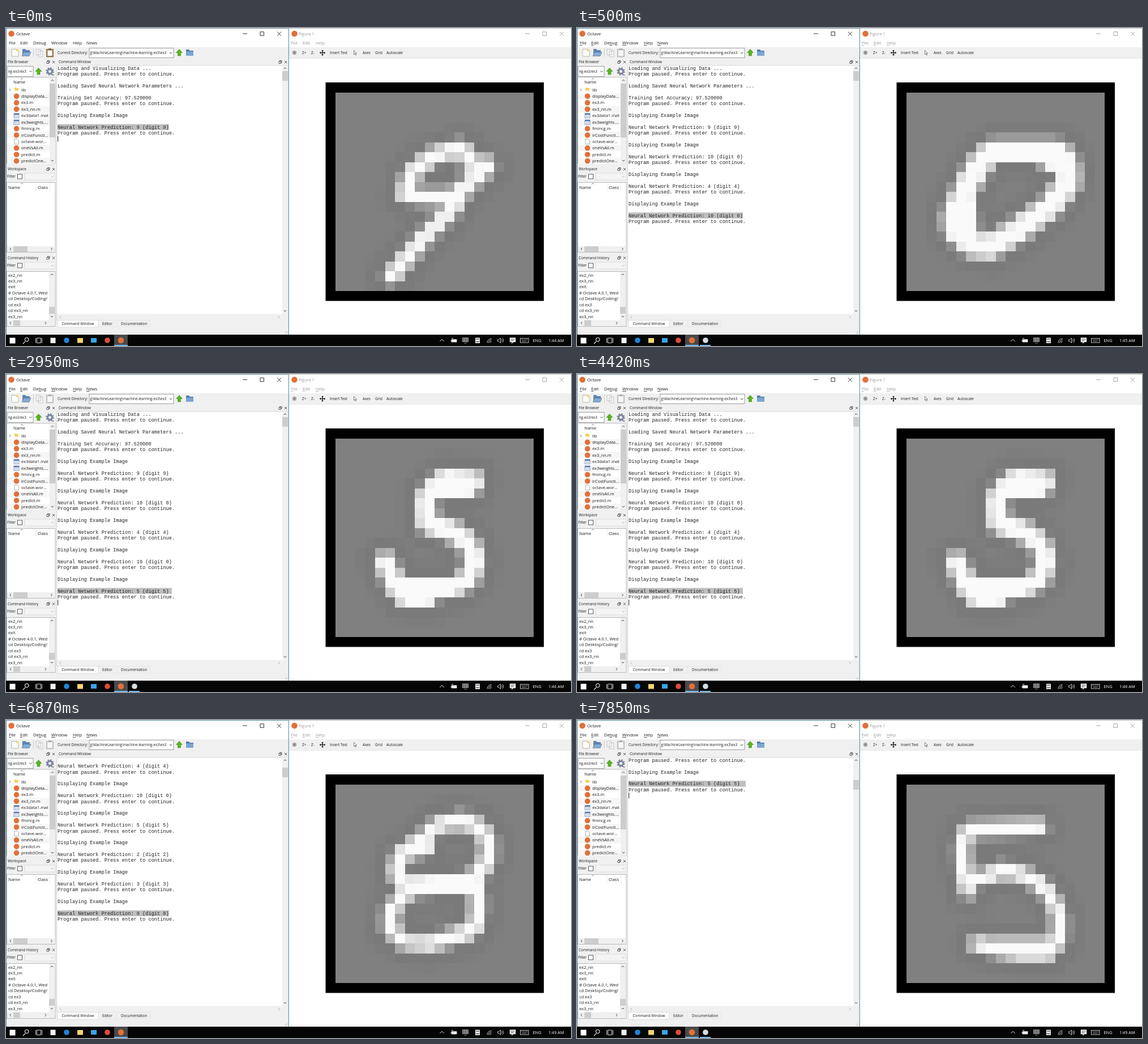
Write an HTML page with a canvas that moves like this. It is 998x561 px and loops after 8000 ms.

```html
<!DOCTYPE html>
<html lang="en">
<head>
<meta charset="utf-8">
<title>Octave</title>
<style>
html, body { margin: 0; width: 100%; height: 100%; overflow: hidden; background: #fff; }
svg { position: absolute; left: 0; top: 0; font-family: "Open Sans", sans-serif; }
canvas { position: absolute; left: 582px; top: 113.8px; width: 350.4px; height: 350.4px; image-rendering: pixelated; }
.mono { font-family: "Liberation Mono", monospace; }
.key { text-decoration: underline; }
</style>
</head>
<body>
<svg width="998" height="561"><g id="still"></g><g id="live"></g></svg>
<canvas id="digit" width="20" height="20"></canvas>
<script>
const ORANGE = '#e2703a', PALE = '#f0f0f0', EDGE = '#c8c8c8', INK = '#1c1c1c';

const rect = (x, y, w, h, fill, stroke = 'none') =>
  `<rect x="${x}" y="${y}" width="${w}" height="${h}" fill="${fill}" stroke="${stroke}" stroke-width=".8"/>`;
const dot = (x, y, r, fill) => `<circle cx="${x}" cy="${y}" r="${r}" fill="${fill}"/>`;
const path = (d, stroke, width = 1, fill = 'none', dash = 'none') =>
  `<path d="${d}" stroke="${stroke}" stroke-width="${width}" fill="${fill}" stroke-dasharray="${dash}"/>`;
// y is the middle of the line; "&" marks the shortcut letter that follows it
const text = (x, y, s, size = 7.5, fill = INK, cls = '') =>
  `<text x="${x}" y="${y + size * .35}" font-size="${size}" fill="${fill}" class="${cls}">` +
  s.replace(/&(.)/, '<tspan class="key">$1</tspan>') + '</text>';
const label = (x, y, s, fill) => text(x, y, s, 6.4, fill);
const mono = (x, y, s) => text(x, y, s, 8.63, '#222', 'mono');
const chevron = (x, y, angle = 0, color = '#444', r = 2.2) =>
  `<path d="M${-r} ${-r / 2}L0 ${r / 2}L${r} ${-r / 2}" fill="none" stroke="${color}" transform="translate(${x} ${y}) rotate(${angle})"/>`;
const folder = (x, y, s, fill) =>
  path(`M${x} ${y}h${s * .4}l${s * .1} ${s * .15}h${s * .5}v${s * .65}h${-s}z`, 'none', 0, fill);
const upArrow = (x, y) => path(`M${x} ${y - 6}l5.5 6h-3v5.5h-5v-5.5h-3z`, '#3c8a14', .6, '#58b520');

function windowButtons(x, color) {
  return path(`M${x} 10h8M${x + 31} 6.8h6.5v6.5h-6.5zM${x + 61} 6.7l7 7m0-7l-7 7`, color, .9);
}
function dockTitle(x, y, right, s) {
  return label(x, y, s) +
    path(`M${right - 13} ${y - 1}h3.5v3.5h-3.5zM${right - 11.5} ${y - 1}v-1.5h3.5v3.5h-1.5M${right - 3} ${y - 2}l4.2 4.2m0-4.2l-4.2 4.2`, '#333', .8);
}
function vScroll(x, top, bottom, thumbTop, thumbHeight) {
  return rect(x, top, 10, bottom - top, PALE) + rect(x, thumbTop, 10, thumbHeight, '#cdcdcd') +
    chevron(x + 5, top + 5, 180) + chevron(x + 5, bottom - 5);
}
function hScroll(left, right, y, thumbLeft, thumbWidth, color) {
  return rect(left, y, right - left, 10, PALE) + rect(thumbLeft, y, thumbWidth, 10, '#cdcdcd') +
    chevron(left + 6, y + 5, 90, color) + chevron(right - 6, y + 5, -90, color);
}
const filterRow = y => label(2, y, 'Filter') + rect(20.5, y - 4, 8, 8, '#fff', '#333') +
  rect(33, y - 6, 54, 12, '#f4f4f4', '#d8d8d8') + chevron(82, y, 0, '#bbb');

function fileBrowser() {
  const files = ['lib', 'displayData...', 'ex3.m', 'ex3_nn.m', 'ex3data1.mat', 'ex3weights....', 'fmincg.m',
    'lrCostFuncti...', 'octave-wor...', 'oneVsAll.m', 'predict.m', 'predictOne...'];
  let s = rect(1.5, 87, 85.5, 152, '#fff', '#aaa') + chevron(28, 89.5, 180, '#777', 1.8) + text(13, 95.5, 'Name');
  files.forEach((name, i) => {
    const y = 109 + i * 11.42;
    if (i % 2) s += rect(2, y - 5.7, 75, 11.4, '#f6f6f6');
    if (name == 'lib') s += chevron(7, y, -90, '#777') + folder(15, y - 4, 7, '#f5cf60');
    else if (/data1|weights/.test(name))
      s += rect(14, y - 4, 9, 8, '#fff', '#6d86b0') + rect(14, y - 4, 9, 2.5, '#5577b0') +
        path(`M14 ${y + 1}h9m-6-3v6m3-6v6`, '#9bb0d0', .7);
    else if (name.startsWith('octave')) s += path(`M15 ${y - 4.5}h5l2.5 2.5v6.5h-7.5z`, '#888', .7, '#fff');
    else s += dot(18.5, y, 4.8, ORANGE);
    s += text(27, y, name);
  });
  return s + rect(0, 239.4, 88, 4, PALE) + vScroll(77, 87.5, 239, 98, 95);
}

function commandHistory() {
  const commands = ['ex2_nn', 'ex3_nn', 'exit', '# Octave 4.0.1, Wed', 'cd Desktop/Coding/', 'cd ex3', 'cd ex3_nn', 'ex3_nn'];
  return rect(1.5, 429.5, 85.5, 97, '#fff', '#aaa') +
    commands.map((c, i) => text(4, 436 + i * 10.42, c)).join('') +
    vScroll(76, 430, 514, 492, 12) + hScroll(2, 76, 515.5, 13, 12) + rect(76, 514, 10, 12, PALE);
}

function taskbar() {
  const W = '#eee';
  return rect(0, 541, 998, 20, '#060606') + rect(6.5, 546.5, 10, 10, '#fff') +
    path('M34 553l-4 4M40 549.5a3.3 3.3 0 1 1-6.6 0a3.3 3.3 0 1 1 6.6 0', W, 1.1) +
    path('M54.5 547h7v8.5h-7zM52.5 547v8.5M63.5 547v8.5', W, .9) +
    rect(78.5, 546.5, 9, 9.5, '#f2f2f2') + dot(107, 551, 4.8, '#1f84d8') +
    rect(126, 547, 10, 8.5, '#f6d66f') + rect(150, 547, 10, 8, '#39a5e8') + dot(179, 551, 4.8, '#dd4b3e') +
    rect(191, 541, 24, 20, '#4a4a4a') + rect(191, 559, 24, 2, '#76b9ed') + dot(203, 551, 5.3, ORANGE) +
    // tray
    chevron(770, 551, 180, W, 3.6) + path('M787 549.5h9v4.5h-9zM786 550.5v2.5', W, .8, W) + path('M787 547.5h3', W) +
    rect(806.5, 546.5, 10, 7, '#555', '#aaa') + path('M806 549h11M806 551.5h11M810 546v8M813.5 546v8M809 556h5', '#aaa', .7) +
    rect(829, 546.5, 8, 9.5, W) + path('M830 549h6M830 553.5h6', '#222') +
    path('M850 555.5a7.5 7.5 0 0 1 7.5-7.5M852.5 555.5a5 5 0 0 1 5-5M855 555.5a2.5 2.5 0 0 1 2.5-2.5', W, .9) +
    path('M868.5 549.7h2l3-2.7v8.5l-3-2.7h-2zM875.3 549a3 3 0 0 1 0 4.5M877 547.3a5.3 5.3 0 0 1 0 7.8', W, .8) +
    path('M890 546.5h10v7.5h-4l-2.5 2.5v-2.5h-3.5z', W, .5, W) + path('M891.5 549h7M891.5 551.5h5', '#222', .7) +
    rect(908.5, 547.5, 14.5, 7.5, 'none', W) + path('M910.5 550h11M912 552.6h7.5', W, 1, 'none', '1.3 1') +
    text(930.5, 551, 'ENG', 7.4, '#fff');
}

function stillParts() {
  return rect(0, 0, 998, 541, '#fff') + rect(0, 34, 499, 507, PALE) + rect(500, 34, 498, 19.5, PALE) +
    // main window frame and toolbar
    dot(9.5, 10, 5.3, ORANGE) + text(18, 10, 'Octave') + windowButtons(418, INK) +
    path('M10 37.5h9l3 3v9.5h-12z', '#999', .7, '#fdfdf6') + dot(20, 39, 2.2, '#f5d96a') +
    folder(29, 37, 13, '#5e87b5') + path('M28 49.5l3-7h13l-3 7z', '#456', .5, '#83abd6') +
    path('M48.5 36v15', '#bbb', .7) +
    path('M53 37.5h8v10h-8zM57 40.5h8v10.5h-8z', '#bbb', .8, '#f4f4f4') +
    label(91, 43.7, 'Current Directory:') + rect(147, 35.5, 149, 17, '#fff', '#888') +
    text(148.5, 43.7, 'g\\MachineLearning\\machine-learning-ex3\\ex3', 6.3) + chevron(291, 44) +
    upArrow(306, 43.5) + folder(318, 38, 13, '#4f7cab') + rect(318, 41.5, 13, 7.5, '#7ba6d2') +
    // docks
    dockTitle(3, 60, 85, 'File Browser') + rect(2, 67.5, 46, 18, '#fff', '#888') + text(3.5, 76.5, 'ng-ex3/ex3', 6.3) +
    chevron(43.5, 76.5) + upArrow(57.5, 76.5) +
    path('M83.5 76.5a6 6 0 1 1-12 0a6 6 0 1 1 12 0', '#7c86a0', 2.4, 'none', '2.6 2.1') +
    path('M81.5 76.5a4 4 0 1 1-8 0a4 4 0 1 1 8 0', '#7c86a0', 3) + chevron(83, 83, 0, '#222', 1.6) +
    fileBrowser() +
    dockTitle(3, 249, 85, 'Workspace') + filterRow(262) + rect(1.5, 272.5, 85.5, 123, '#fff', '#aaa') +
    chevron(28, 274.5, 180, '#777', 1.8) + text(4, 281, 'Name') + text(56, 281, 'Class') +
    path('M53 273v15M77.5 273v15', '#e2e2e2', .7) + hScroll(2, 86.5, 385, 13, 25) +
    dockTitle(3, 405.5, 85, 'Command History') + filterRow(419) + commandHistory() +
    // console
    dockTitle(93, 60, 495, 'Command Window') + rect(90, 66, 408, 438.5, '#fff') + path('M90 66h408M89.6 66v450', EDGE, .7) +
    hScroll(90, 488, 505, 90, 0, '#b5b5b5') + rect(91, 515.5, 72, 12.5, '#fff', '#d5d5d5') +
    path('M163 516h32.5v11h-32.5M195.5 516h59v11h-59', '#ddd', .6) +
    label(98.5, 521.5, 'Command Window') + label(170, 521.5, 'Editor') + label(203, 521.5, 'Documentation') +
    path('M493 539l4-4M495.5 539l1.5-1.5', '#aaa', .8) +
    path('M.4 541V.4H499.3V541', '#4b8797') +
    // figure window
    dot(509.5, 10, 5.3, ORANGE) + text(517, 10, 'Figure 1', 7.5, '#999') + windowButtons(917, '#999') +
    path('M500 .4H998', '#aaa', .8) + path('M500 53.5H998', '#dedede', .6) +
    dot(509.5, 43.5, 3.7, '#aaa') + path('M507 43.5h5M509.5 41v5', '#777', .8) +
    label(523, 43.7, 'Z+') + label(539, 43.7, 'Z-') +
    path('M555 43.7h8M559 39.7v8', '#111', 1.2) +
    path('M559 38.5l2 2.2h-4zM559 49l2-2.2h-4zM553.8 43.7l2.2-2v4zM564.2 43.7l-2.2-2v4z', 'none', 0, '#111') +
    label(572, 43.7, 'Insert Text') + path('M614.5 39.5v7l1.7-1.6l1.3 3l1-.5l-1.3-2.8h2.3z', '#333', .6, '#fff') +
    label(630, 43.7, 'Axes') + label(652, 43.7, 'Grid') + label(672, 43.7, 'Autoscale') +
    rect(564.5, 96, 385.5, 385.5, '#000') + taskbar();
}

const predictions = [9, 0, 4, 0, 5, 2, 3, 8, 1, 7, 6, 4, 2, 5];
const PAUSED = 'Program paused. Press enter to continue.';
const log = ['Loading and Visualizing Data ...', PAUSED, '', 'Loading Saved Neural Network Parameters ...', '',
  'Training Set Accuracy: 97.520000', PAUSED, ''];
for (const p of predictions)
  log.push('Displaying Example Image', '', `Neural Network Prediction: ${p || 10} (digit ${p})`, PAUSED, '');

// pen strokes are in cells of the 20 x 20 picture
const scenes = [
  { start: 0, count: 1, scroll: 0, clock: '1:44', caret: true, extra: 0, pen: 1.6,
    stroke: 'M15.4 7.4L13.5 7 13.3 6.2 12.5 5.6 9.5 6.6 7.6 8.2 7 10.3 9 10.5 12 10.3 15.2 7.7M12.6 10.3L11.5 12 9 14.5 5.6 18.5' },
  { start: 500, count: 4, scroll: 0, clock: '1:45', paint: true, extra: 0, pen: 2.4,
    stroke: 'M8.7 5.9L15.3 5.9 16.2 7.2 16.3 9 14.6 11.4 11 14 8.5 15.5 6.6 15.3 4.9 13.8 4.8 12.2 6.2 9.2 7.8 6.6ZM5.8 11L6 14M14.6 6.8h.5' },
  { start: 2950, count: 5, scroll: 0, clock: '1:46', caret: true, paint: true, extra: 1, pen: 2,
    stroke: 'M14 4.3L11 4.1 9.8 5 9.1 6 9.2 8.5 11.5 9.2 13.3 10.3 14.1 12.2 13.4 14.2 12 15 6.2 15 5 12.4M7 16L9.3 16M10 4.8L13.5 5' },
  { start: 5400, count: 8, scroll: 19, clock: '1:49', extra: 0, pen: 1.55,
    stroke: 'M12.8 3.6L14.4 4.2 15.4 5.5 15.4 7.5 14.2 9.2 13 9.5 7 10 6.1 9 6.5 7.2 8.5 5.7 10.3 4 12.8 3.6M8 6.6L9.3 6.2M13.5 10L7 10.6 6.9 11.3 5.6 12.5 5.5 14.5 6.8 15.7 9.5 16.1 13 15.1 14.2 14.2 14.4 12 14.2 10' },
  { start: 7850, count: 14, scroll: 71, clock: '1:49', caret: true, paint: true, extra: 2, pen: 1.5,
    stroke: 'M13.5 4.3L6.2 4.4 5.6 6 5.7 8.5 6.2 10.7M6 9.6L8 9.3 9.5 8.6 11.5 9 13 9.6 14.4 11 15.4 13 15.4 15.5 14.2 17 11.5 17 9 16.4 7 16.1M14.5 16.3L9 16.2' }
];

const rowY = row => 70.8 + row * 10.39;

function consoleText({ count, scroll, caret, extra }) {
  const end = 7 + count * 5, rows = log.slice(scroll, end), mark = rows.length - 2;
  return rect(91, rowY(mark) - 5.1, (rows[mark].length + extra) * 5.18, 10.4, '#bfbfbf') +
    rows.map((s, i) => mono(91, rowY(i), s)).join('') +
    (caret ? path(`M91.7 ${rowY(mark + 2) - 5}v10`, '#000', .9) : '') +
    vScroll(488, 66, 504, 76 + scroll * .42, 17);
}

function liveParts(scene, index) {
  const menu = (x, s, fill) => text(x, 26.7, index ? s : s.replace('&', ''), 7.5, fill);
  const items = [[5, '&File'], [25, '&Edit'], [48, 'De&bug'], [80, '&Window'], [118, '&Help'], [142, '&News']];
  const grey = [[503, '&File'], [524, '&Edit'], [547, '&Help']];
  const [board, rim] = index ? ['#d5d5d5', '#aaa'] : ['#a98450', '#6b5a3c'];
  return items.map(([x, s]) => menu(x, s)).join('') + grey.map(([x, s]) => menu(x, s, '#999')).join('') +
    rect(71.5, 37.5, 12, 13.5, board, rim) + rect(73.5, 39.5, 8, 9.5, '#f8f8f8') + rect(75, 36.2, 5, 2.6, rim) +
    consoleText(scene) +
    (scene.paint ? rect(217, 559, 19, 2, '#76b9ed') + dot(227, 551, 4.8, '#d5dde2') : '') +
    text(958, 551, scene.clock + ' AM', 7.3, '#fff');
}

const pen = digit.getContext('2d');
pen.lineJoin = pen.lineCap = 'round';
function drawDigit({ stroke, pen: width }) {
  const shape = new Path2D(stroke);
  pen.fillStyle = '#808080';
  pen.fillRect(0, 0, 20, 20);
  for (const [w, color] of [[width + 3, '#7a7a7a'], [width, '#fafafa']]) {
    pen.lineWidth = w;
    pen.strokeStyle = color;
    pen.stroke(shape);
  }
}

still.innerHTML = stillParts();
let shown = -1;
function tick() {
  const t = performance.now() % 8000;
  const index = scenes.findLastIndex(s => t >= s.start);
  if (index != shown) {
    shown = index;
    live.innerHTML = liveParts(scenes[index], index);
    drawDigit(scenes[index]);
  }
  requestAnimationFrame(tick);
}
tick();
</script>
</body>
</html>
```
